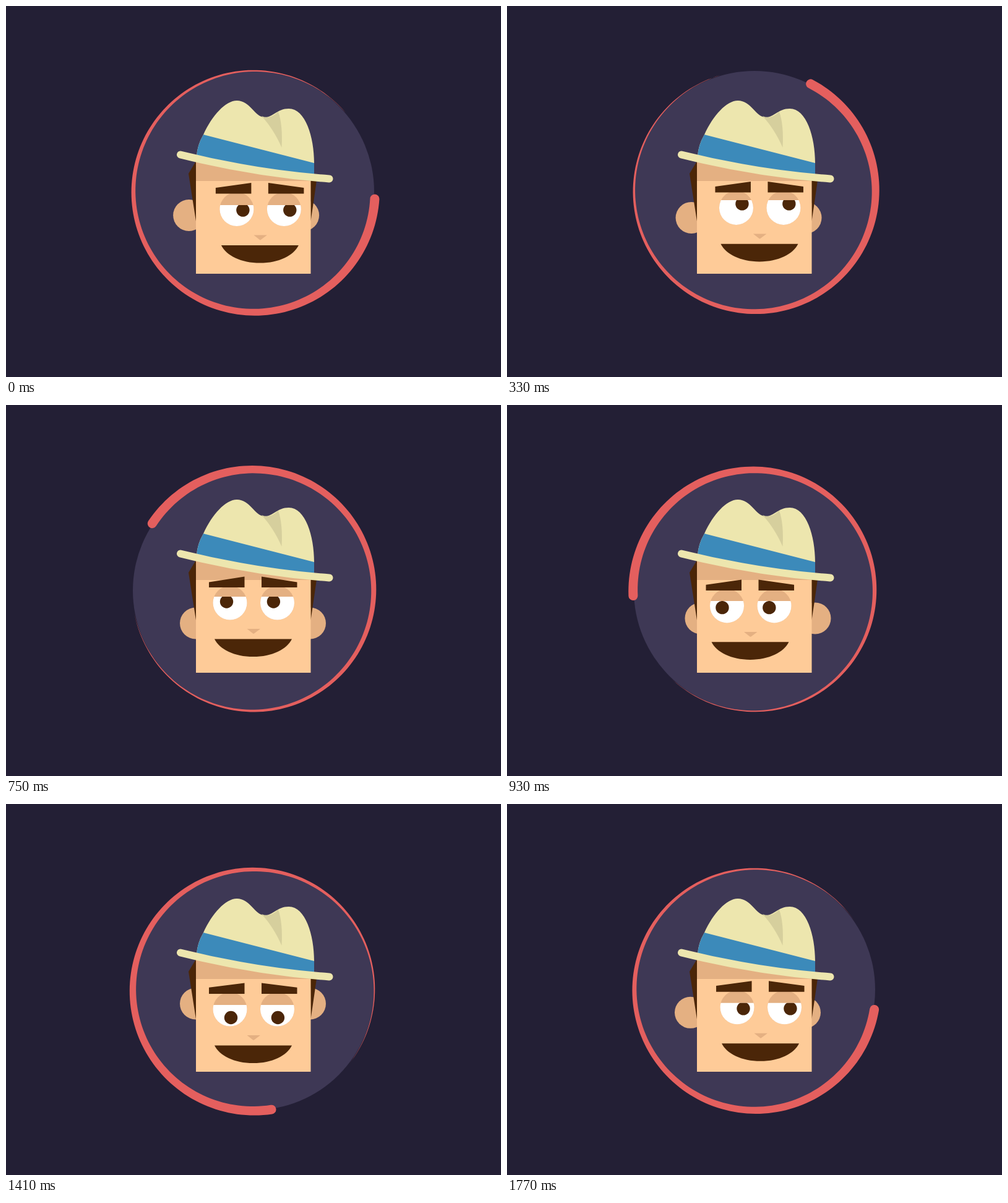
An HTML page for the animation above (1800 ms loop, 800 by 600 pixels).

```html
<!DOCTYPE html>
<html lang="en">
<head>
<meta charset="utf-8">
<title>Looking around</title>
<style>
  html, body { margin: 0; width: 100%; height: 100%; overflow: hidden; background: #231f35; }
  svg { display: block; width: 100vw; height: 100vh; }
  .skin { fill: #fecb98; }
  .shade { fill: #e4b082; }
  .hair { fill: #4b2608; }
  .white { fill: #fff; }
  .hat { fill: #ede6ae; }
</style>
</head>
<body>
<svg viewBox="0 0 800 600">
  <defs>
    <clipPath id="open"><rect id="lid" x="300" y="306" width="200" height="60"/></clipPath>
  </defs>
  <circle cx="400" cy="300" r="195" fill="#3e3855"/>
  <path id="ring" fill="#e45f5e"/>

  <g id="ears" class="shade">
    <circle cx="306.5" cy="353" r="25.5"/>
    <circle cx="491.5" cy="353" r="25.5"/>
  </g>
  <path class="hair" d="M307 251 295 271 307 348ZM492 275H502.5L501.5 286 492.5 348Z"/>
  <path class="skin" d="M307 247H492.5V433H307Z"/>
  <path class="shade" d="M307 247H492.5V283H307Z"/>

  <g id="face">
    <g class="shade">
      <circle cx="362" cy="320" r="27.5"/>
      <circle cx="438.5" cy="320" r="27.5"/>
      <path d="M389.5 362H411L401 369.5Q400 370.3 399 369.5Z"/>
    </g>
    <path id="brows" class="hair"/>
    <g clip-path="url(#open)">
      <g class="white">
        <circle cx="362" cy="320" r="27.5"/>
        <circle cx="438.5" cy="320" r="27.5"/>
      </g>
      <g id="pupils" class="hair">
        <circle cx="362" cy="320" r="10.7"/>
        <circle cx="437.9" cy="320" r="10.7"/>
      </g>
    </g>
    <path class="hair" d="M337 378.4C345 395 369 407 399.5 407S454 395 462 378.4Z"/>
  </g>

  <path class="hat" d="M308 243Q309 225 319 208C333 177 355 153 373 153C395 153 402 180 418 180C432 180 438 166 457 166C484 166 498 212 498 254V273Z"/>
  <path fill="#d6cf9d" d="M413 178Q427 184 440 171Q447.5 192 445.5 229C438 211 427 193 413 178Z"/>
  <path fill="#3c8aba" d="M319 208 498 254V274L400 264 308 244Q309 225 319 208Z"/>
  <path d="M282 240.5Q402 270.5 522.5 279.5" fill="none" stroke="#ede6ae" stroke-width="12" stroke-linecap="round"/>
</svg>
<script>
const LOOP = 1800, STEP = 30;
const $ = id => document.getElementById(id);

// Tapered arc with a round head at angle 0, slightly off the turning centre
function ringPath() {
  const span = 316, outer = [], inner = [];
  for (let a = 0; a <= span; a += 2) {
    const c = Math.cos(a * Math.PI / 180), s = Math.sin(a * Math.PI / 180);
    const mid = 195.2 + 1.1 * c, half = 7.5 * (1 - a / span);
    const point = r => (r * c).toFixed(2) + ' ' + (r * s).toFixed(2);
    outer.push(point(mid + half));
    inner.unshift(point(mid - half));
  }
  return `M${outer.join('L')}L${inner.join('L')}A7.5 7.5 0 0 1 ${outer[0]}Z`;
}

// The brows level out as the head goes down
function browPath(y) {
  const top = 286.5 - y * .14;
  return `M328 ${top} 385.5 277.5V295H328ZM413 277.5 470.5 ${top}V295H413Z`;
}

// Head turns: start, end, then face x, face y, ear y at the end
const right = [11.2, 8.5, -14];
const turns = [
  [230, 540, [0, 0, 0]],
  [765, 1065, [-11.3, 8.5, -14]],
  [1110, 1410, [0, 12, -30]],
  [1530, 1830, right]
];

function headPose(t) {
  if (t < STEP) t += LOOP;
  let pose = right;
  for (const [start, end, goal] of turns) {
    const u = Math.min(1, Math.max(0, (t - start) / (end - start)));
    const k = u * u * (3 - 2 * u);
    pose = pose.map((v, i) => v + (goal[i] - v) * k);
  }
  return pose;
}

// Gaze keys: time, pupil x, pupil y, eyelid height
const gaze = [
  [0, 10, 1.5, 313.5],
  [330, 9.5, -6.5, 307.5],
  [540, 0, -6, 306],
  [750, -5.5, -2, 310],
  [1110, -7.5, 7.5, 313.5],
  [1410, 1.5, 13.5, 313],
  [1770, 10, 2, 313]
];

function gazeKey(i) {
  const n = gaze.length, turn = Math.floor(i / n);
  const [time, ...rest] = gaze[i - turn * n];
  return [time + turn * LOOP, ...rest];
}

// Smooth periodic curve through the gaze keys
function gazePose(t) {
  const i = gaze.findLastIndex(key => key[0] <= t);
  const [p, a, b, q] = [-1, 0, 1, 2].map(d => gazeKey(i + d));
  const d = b[0] - a[0], u = (t - a[0]) / d, w = 1 - u;
  return [1, 2, 3].map(c => {
    const m = (b[c] - p[c]) / (b[0] - p[0]) * d;
    const n = (q[c] - a[c]) / (q[0] - a[0]) * d;
    return w * w * (1 + 2 * u) * a[c] + u * w * w * m
         + u * u * (3 - 2 * u) * b[c] - u * u * w * n;
  });
}

const move = (id, x, y) => $(id).setAttribute('transform', `translate(${x} ${y})`);

function draw() {
  const t = Math.floor(performance.now() % LOOP / STEP) * STEP;
  const [x, y, earY] = headPose(t);
  const [px, py, lid] = gazePose(t);
  $('ring').setAttribute('transform', `translate(400 300) rotate(${3.5 - t * 360 / LOOP})`);
  move('face', x, y);
  move('ears', -x, earY);
  move('pupils', px, py);
  $('brows').setAttribute('d', browPath(y));
  $('lid').setAttribute('y', lid);
  requestAnimationFrame(draw);
}

$('ring').setAttribute('d', ringPath());
draw();
</script>
</body>
</html>
```
